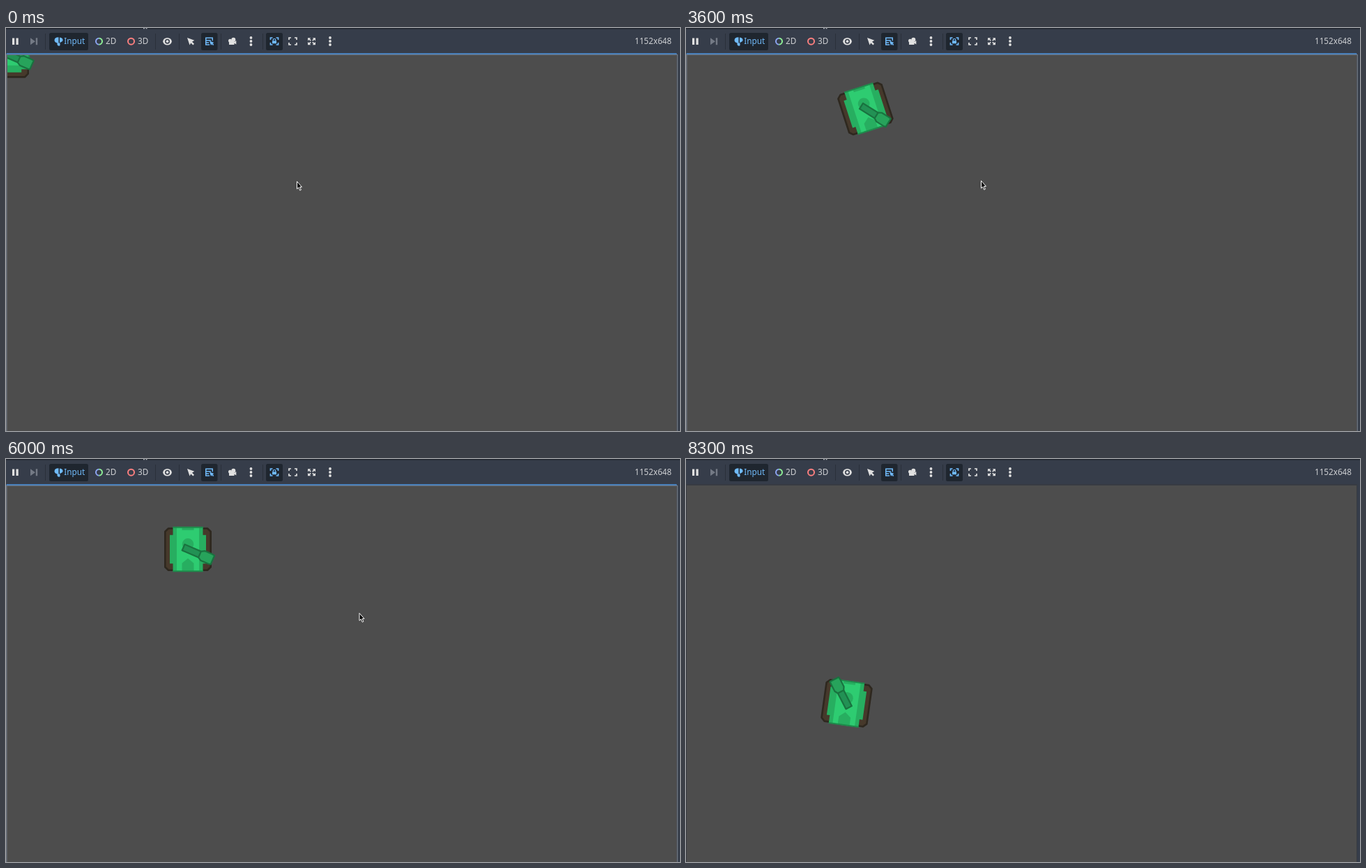
These frames come from a looping animation (967 by 579 pixels, 8.4 s). An HTML page:

```html
<!DOCTYPE html>
<html lang="en">
<head>
<meta charset="utf-8">
<title>Tank</title>
<style>
  html, body { margin: 0; width: 100%; height: 100%; overflow: hidden; background: #363d4a; }
  svg { display: block; width: 100%; height: 100%; }
  text { font: 11.7px "Noto Sans", "Open Sans", sans-serif; }
</style>
</head>
<body>
<svg viewBox="0 0 967 579">
  <defs>
    <clipPath id="view"><path d="M2 39H962.5V579H2z"/></clipPath>
    <path id="corners" d="M-5.5-2V-5H-2.5M2.5-5H5.5V-2M5.5 2V5H2.5M-2.5 5H-5.5V2" fill="none" stroke-width="1.7"/>
    <path id="arrow" d="M-1-1L-5.5-1-4-2.5-6-4.5-4.5-6-2.500-4-1-5.500z"/>
    <path id="out" d="M5.500-5V-.7L3.800-2.400 1.900-.5.7-1.700 2.600-3.600 1.200-5z"/>
    <path id="side" d="M-30 20V28L-25.500 32.700H25.500L30 28V20z"/>
    <g id="dots"><circle cy="-5" r="1.900"/><circle r="1.900"/><circle cy="5" r="1.900"/></g>
  </defs>

  <!-- toolbar -->
  <path fill="#363d4a" d="M0 0H967V579H0z"/>
  <path fill="#21262e" d="M0 0H967V1.500H0z"/>
  <path fill="#b5b9c0" d="M197 0h2v1.300h-2zM200.500 0h2v1.300h-2z"/>
  <path stroke="#2a303a" d="M56.500 8V31M214.500 8V31M248.500 8V31M308.500 8V31M368.500 8V31"/>
  <g fill="#1f262f">
    <rect x="62" y="7" width="56" height="25" rx="2.500"/>
    <rect x="280" y="7" width="23.500" height="25" rx="2.500"/>
    <rect x="373" y="7" width="24" height="25" rx="2.500"/>
  </g>
  <g fill="#e0e0e0">
    <path d="M9 14.500h3.200v9.500h-3.200zM14.500 14.500h3.200v9.500h-3.200z"/>
    <path fill="#747a85" d="M35 14.300L42 19.200 35 24.200zM42.800 14.300h2.400v9.900h-2.400z"/>
    <ellipse cx="231.500" cy="19.200" rx="6.300" ry="5.200"/>
    <circle cx="231.500" cy="19.200" r="3.500" fill="#363d4a"/>
    <circle cx="231.500" cy="19.200" r="1.900"/>
    <path d="M260 14L270.300 17.800 267 19.700 270 22.700 268.300 24.400 265.300 21.400 263.500 24.500z"/>
    <circle cx="326.300" cy="16.700" r="3"/><circle cx="321.500" cy="18.200" r="2.500"/>
    <path d="M320 18.500H327.500V20L330.300 18V23.500L327.500 21.700V24H320z"/>
    <use href="#dots" x="351.500" y="19"/>
    <use href="#dots" x="465" y="19"/>
    <g transform="translate(438.500 19.200)">
      <use href="#out"/><use href="#out" transform="scale(-1 1)"/>
      <use href="#out" transform="scale(1 -1)"/><use href="#out" transform="scale(-1 -1)"/>
    </g>
  </g>
  <use href="#corners" x="411.500" y="19" stroke="#e0e0e0"/>
  <use href="#corners" x="385" y="19" stroke="#70bafa"/>
  <g fill="#70bafa">
    <path d="M382 18.300H388V22.300H382z"/>
    <path d="M383.200 18.500V17.300a1.800 1.800 0 0 1 3.600 0V18.500" fill="none" stroke="#70bafa" stroke-width="1.200"/>
    <path d="M75.500 13.300V21.500H77.500V24.500Q77.500 25.800 76 25.800 74 25.800 73.500 24V21.500Q69.500 20.500 69.500 17.400 69.800 13.300 75.500 13.300z"/>
    <path d="M77 13.500Q81.500 14 81.500 17.300 81.500 20 77 21z"/>
    <path d="M286 13.500H297V18.300H295.500V15H287.500V17H294V18.500H287.500V20.200H291V21.700H287.500V23.300H292V24.800H286z"/>
    <path d="M292 18.500L298.500 21 296.500 22 298.300 23.900 297 25 295.200 23.200 294 25z"/>
    <text x="83.300" y="23.300">Input</text>
  </g>
  <g fill="none" stroke-width="2">
    <path stroke="#8da5f3" d="M133.500 14.700a4.500 4.500 0 0 0 0 9"/>
    <path stroke="#8eef97" d="M133.500 14.700a4.500 4.500 0 0 1 0 9"/>
    <circle cx="179.500" cy="19.200" r="4.500" stroke="#fc7f7f"/>
  </g>
  <g fill="#cdcfd2">
    <text x="143" y="23.300">2D</text>
    <text x="189" y="23.300">3D</text>
    <text x="902" y="23.300">1152x648</text>
  </g>

  <!-- game view -->
  <path fill="#373b42" d="M0 36H963V579H0z"/>
  <path fill="#4d4d4d" d="M1 38H962V579H1z"/>
  <g id="focus">
    <path fill="#6c737e" d="M0 38H964V579H962.500V39H1.500V579H0z"/>
    <path fill="#4a80ba" d="M1 36H962L963 38H0z"/>
  </g>
  <g clip-path="url(#view)">
    <g id="tank">
      <g fill="#46392b" stroke="#2e281f" stroke-width="2.600" stroke-linejoin="round">
        <use href="#side"/><use href="#side" transform="scale(1 -1)"/>
      </g>
      <path fill="#27ae60" d="M-32-21.500H-20.500V-26H20.500V-21.500H32V21.500H20.500V26H-20.500V21.500H-32z"/>
      <path fill="#2ecc71" d="M-32-16H32V16H-32z"/>
      <path fill="#27ae60" d="M13 0L20-8.500H32V8.500H20zM-31-8.500H-27.500V8.500H-31z"/>
      <circle cx="-7.500" r="8.300" fill="#27ae60"/>
      <path stroke="#1e8a4b" stroke-width="2" d="M-31.500-21.500V21.500M31.500-21.500V21.500"/>
    </g>
    <g id="barrel" stroke="#19723f" stroke-width="2.200" stroke-linejoin="round">
      <path fill="#229154" d="M-7-4.700H20V4.700H-7z"/>
      <path fill="#27a35b" d="M18.500-4.700L23-7.400H35L38.500-6.900V6.900L35 7.400H23L18.500 4.700z"/>
    </g>
  </g>
  <path id="cursor" fill="#000" stroke="#fff" d="M.5.500V11.200L2.800 9 4.700 13.300 6.400 12.500 4.600 8.400H7.500z"/>
</svg>
<script>
const LOOP = 8400, STEP = 100, RAD = Math.PI / 180;
const SPEED = 0.167, TURN = 0.172;  // px and degrees per ms
const el = id => document.getElementById(id);
const tank = el('tank'), barrel = el('barrel'), cursor = el('cursor'), focusRing = el('focus');
const clamp = k => Math.max(0, Math.min(1, k));

// The tank first turns on the spot, then drives: rest ms, straight ms, curve in degrees
const SPIN = { from: 870, ms: 420, angle: 52 }, DEPART = 1569;
const drive = [
  [0, 565, -105], [0, 110, 125], [0, 21, 123], [48, 75, 163], [0, 77, 100], [0, 1290, 0]
];

// Mouse: a slow drift to the right, then a wide swing round the tank and out (ms, x, y)
const mouse = [
  [2600, 417, 220], [3600, 423, 219], [4700, 456.5, 222], [5100, 506.5, 221],
  [6000, 506.5, 221], [6200, 535, 140], [6400, 270, 73], [6600, 27, 188.5],
  [6900, 100, 301], [7150, 330, 455], [7400, 535, 260], [7600, 330, 43], [8000, 51, 2]
];

function tankAt(t) {
  let x = 1.7, y = 37.7, spin = 0;
  let a = SPIN.angle * RAD * clamp((t - SPIN.from) / SPIN.ms);
  let left = t - DEPART;
  for (const [rest, ahead, curve] of drive) {
    left -= rest;
    if (left <= 0) break;
    const d = SPEED * Math.min(left, ahead);
    x += d * Math.cos(a);
    y += d * Math.sin(a);
    left -= ahead;
    if (left <= 0 || !curve) break;
    const ms = Math.abs(curve) / TURN, sign = Math.sign(curve);
    const b = a + curve * RAD * clamp(left / ms), r = sign * SPEED / (TURN * RAD);
    x += r * (Math.sin(b) - Math.sin(a));
    y += r * (Math.cos(a) - Math.cos(b));
    a = b;
    spin = left < ms ? sign : 0;
    left -= ms;
  }
  return { x, y, a: a / RAD, spin };
}

function mouseAt(t) {
  let [, x, y] = mouse[0];
  for (let i = 1; i < mouse.length; i++) {
    const [t0, x0, y0] = mouse[i - 1], [t1, x1, y1] = mouse[i];
    const k = clamp((t - t0) / (t1 - t0));
    x += (x1 - x0) * k;
    y += (y1 - y0) * k;
  }
  return [x, y];
}

function place(node, x, y, a = 0) {
  node.setAttribute('transform', `translate(${x} ${y}) rotate(${a})`);
}

function draw(now) {
  const t = Math.floor(now % LOOP / STEP) * STEP;
  const { x, y, a, spin } = tankAt(t), [mx, my] = mouseAt(t);
  place(tank, x, y, a);
  // The hull turns once more after the barrel has taken aim
  place(barrel, x, y, Math.atan2(my - y, mx - x) / RAD + 3 * spin);
  place(cursor, mx, my);
  cursor.style.display = t < 8100 ? '' : 'none';
  focusRing.style.display = t < 8300 ? '' : 'none';
}

const start = performance.now();
function frame() {
  draw(performance.now() - start);
  requestAnimationFrame(frame);
}
frame();
</script>
</body>
</html>
```
